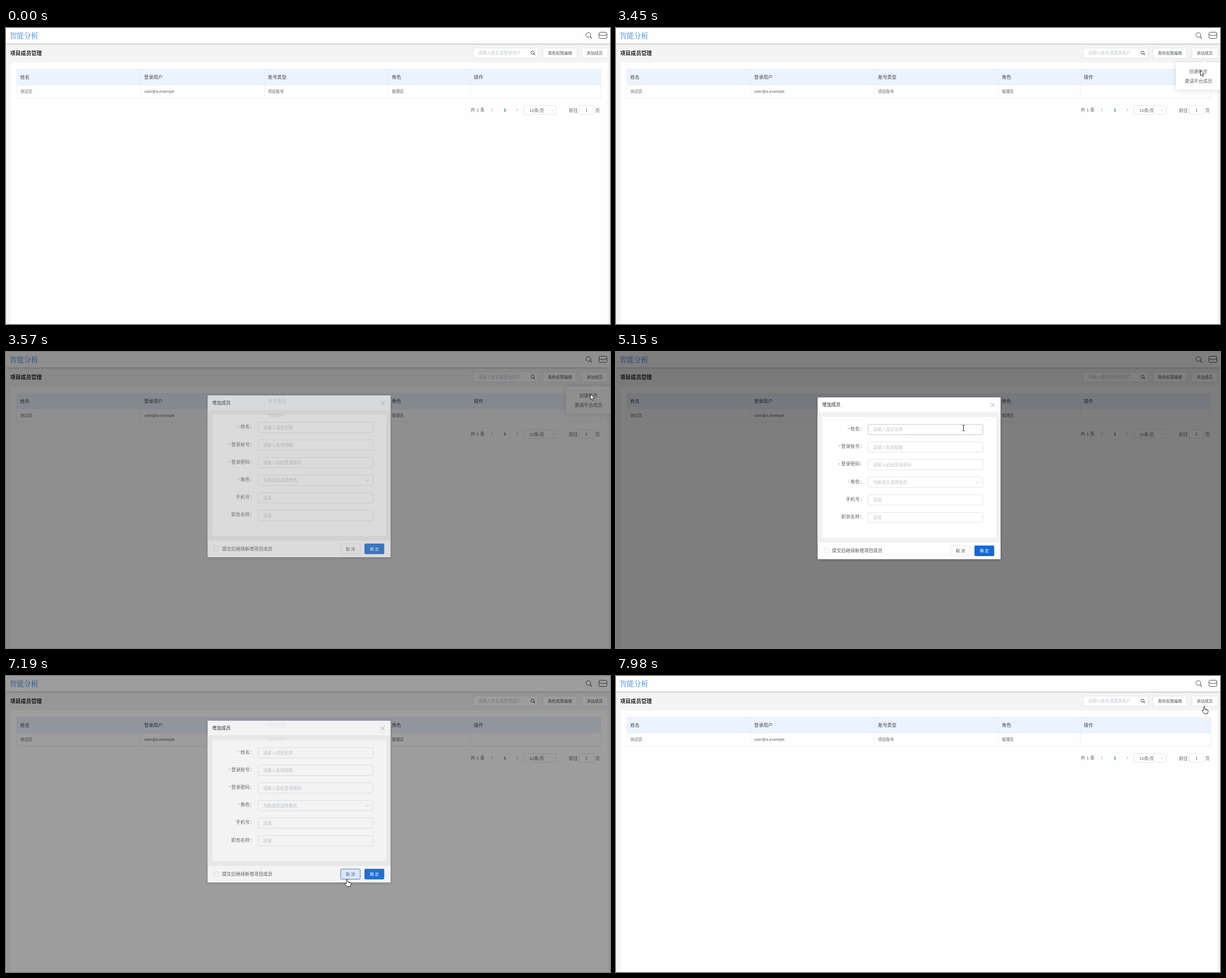
Write an HTML page that moves like this. It is 1068 by 525 pixels and loops after 8 s.

```html
<!DOCTYPE html>
<html>
<head>
<meta charset="utf-8">
<style>
  html, body { margin: 0; width: 100%; height: 100%; overflow: hidden; background: #fefefe; }
  svg { display: block; width: 1068px; height: 525px; font-family: "Liberation Sans", "Noto Sans CJK SC", sans-serif; }
  text { white-space: pre; }
  .header { filter: drop-shadow(0 1px 1.5px rgba(0, 0, 0, .25)); }
  .menu { filter: drop-shadow(0 1px 4px rgba(0, 0, 0, .13)); }
  .box { filter: drop-shadow(0 1px 2px rgba(0, 0, 0, .3)); }
</style>
</head>
<body>
<svg id="stage" viewBox="0 0 1068 525"></svg>
<script>
const LOOP = 8000;
const stage = document.getElementById('stage');

const rect = (x, y, w, h, fill, extra = '') =>
  `<rect x="${x}" y="${y}" width="${w}" height="${h}" fill="${fill}" ${extra}/>`;
const text = (x, y, size, fill, str, extra = '') =>
  `<text x="${x}" y="${y}" font-size="${size}" fill="${fill}" ${extra}>${str}</text>`;
const line = (d, color, width = 0.8, extra = '') =>
  `<path d="${d}" fill="none" stroke="${color}" stroke-width="${width}" ${extra}/>`;
const field = (x, y, w, h, extra = '') =>
  rect(x, y, w, h, '#fff', `stroke="#dcdfe6" stroke-width=".8" rx="2" ${extra}`);
const button = (x, y, w, h, label, id) =>
  `<g id="${id}">` + field(x, y, w, h) +
  text(x + w / 2, y + h / 2 + 2.7, 7.1, '#505256', label, 'text-anchor="middle"') + '</g>';
const lens = (x, y, r, color) =>
  `<circle cx="${x}" cy="${y}" r="${r}" fill="none" stroke="${color}"/>` +
  line(`M${x + r * .7} ${y + r * .7}l${r * .8} ${r * .8}`, color, 1.3);
const chevron = (x, y, s, color) => line(`M${x - s} ${y - s / 2}l${s} ${s}l${s} ${-s}`, color);

function page() {
  const columns = [[19, '姓名', '测试员'], [238, '登录用户', 'user@a.example'], [457, '账号类型', '项目账号'],
    [676, '角色', '管理员'], [821, '操作', '']];
  const grid = '#e9edf4', ink = '#606266';
  return rect(0, 0, 1068, 525, '#f4f4f4') +
    rect(0, 0, 1068, 27.5, '#fefefe', 'class="header"') +
    text(6.5, 17.5, 12.6, '#7aabe8', '智能分析',
      `font-weight="bold" style="font-family:'Noto Serif CJK SC','Noto Sans CJK SC',serif"`) +
    lens(1029.7, 12.3, 4.2, '#555') +
    line('M1050.5 7.5h10q2 0 2 2v7q0 2-2 2h-10q-2 0-2-2v-7q0-2 2-2M1048.5 11.5q7 4 14 0', '#555', 1) +
    text(7.5, 48, 9.3, '#222', '项目成员管理', 'font-weight="bold"') +
    field(826, 35.5, 115, 18) + text(835, 47.3, 7.5, '#c0c4cc', '请输入姓名或登录用户') +
    lens(931, 43.6, 2.8, '#555') +
    button(949.5, 35.5, 60, 18, '角色权限编辑', 'roles') +
    button(1018, 35.5, 46, 18, '添加成员', 'add') +
    rect(8, 61, 1056, 464, '#fefefe') +
    rect(19, 73, 1033, 28, '#ebf3fe') +
    rect(19, 101, 1033, 23.5, '#f5f7fa', 'id="row" opacity="0"') +
    columns.map(([x, head, cell]) => line(`M${x + .3} 73V124.5`, grid) +
      text(x + 6.2, 89.8, 8.2, '#444', head) + text(x + 6.2, 114.5, 7.1, ink, cell)).join('') +
    line('M19 73H1052M19 101H1052M19 124.3H1052M1051.7 73V124.5', grid) +
    text(821.5, 147.7, 8, ink, '共 1 条') +
    line('M860.5 142.5l-2.5 2.5l2.5 2.5M902.7 142.5l2.5 2.5l-2.5 2.5', '#999') +
    text(882, 147.6, 7.5, '#1168c8', '1', 'text-anchor="middle" font-weight="bold"') +
    field(915.5, 137.5, 57.5, 15.5) + text(925.5, 148.5, 7.6, ink, '10条/页') + chevron(966, 146, 2, '#c0c4cc') +
    text(995.3, 148.5, 7.9, ink, '前往') + field(1013.5, 137.5, 26, 15.5) +
    text(1026.3, 148.3, 7.5, ink, '1', 'text-anchor="middle"') + text(1042, 148.5, 7.9, ink, '页');
}

function menu() {
  return '<g id="menu"><g class="menu">' + rect(990, 61, 90, 48.5, '#fff', 'rx="2"') +
    '<path d="M1037.5 61.2l3.5-3.5l3.5 3.5z" fill="#fff"/></g>' +
    text(1013.5, 79.8, 8.15, '#606266', '创建账号') + text(1005.5, 97.3, 8.15, '#606266', '邀请平台成员') + '</g>';
}

function dialog() {
  const rows = [['姓名', '请输入成员名称', 1], ['登录账号', '请输入有效邮箱', 1], ['登录密码', '请输入初始登录密码', 1],
    ['角色', '为新成员选择角色', 1], ['手机号', '选填'], ['职务名称', '选填']];
  return '<g id="dialog">' + rect(356.5, 80.5, 323.5, 287, '#fff', 'class="box" rx="1"') +
    rect(356.5, 106.5, 323.5, 231.5, '#f1f1f1') + rect(365, 115, 307.5, 214.5, '#fff') +
    text(364.5, 96.2, 8.15, '#222', '增加成员', 'font-weight="500"') +
    line('M662.7 90.5l7 7m0-7l-7 7', '#909399') +
    rows.map(([label, hint, required], i) => {
      const y = 128.3 + i * 31.2, x = 431 - label.length * 8.2;
      return (required ? text(x - 5, y + 10.8, 8, '#f56c6c', '*') : '') +
        text(x, y + 10.6, 8.2, '#606266', label + '：') +
        field(445.8, y, 203, 18.3, i ? '' : 'id="name"') + text(454.5, y + 12.1, 7.55, '#c0c4cc', hint);
    }).join('') +
    chevron(639, 231.3, 3, '#c0c4cc') +
    rect(368.2, 348.3, 7.8, 7.8, '#fff', 'stroke="#dcdfe6" stroke-width=".8" rx="1"') +
    text(382, 355.2, 8.1, '#505256', '提交后继续新增项目成员') +
    button(591.8, 343.7, 34.5, 18, '取 消', 'cancel') +
    rect(633.8, 343.3, 35, 18.8, '#1269d9', 'rx="2"') +
    text(651.3, 355.4, 7.1, '#fff', '确 定', 'text-anchor="middle" font-weight="500"') + '</g>';
}

const outlined = 'fill="#fff" stroke="#222" stroke-width=".9" stroke-linejoin="round"';
const cursors = {
  arrow: `<path d="M0 0V9.5L2.2 7.5L3.8 11L5.4 10.3L3.9 6.9H7z" ${outlined}/>`,
  hand: `<path d="M-1 1Q0-.5 1 1V5L6 6.3Q7.3 6.8 7 9L6 13.5H0L-3.5 9Q-4.3 7-2.5 7.3L-1 8.5z" ${outlined}/>` +
    line('M2.8 5.5v2M4.7 6v2', '#222', .7),
  beam: line('M-2-5H-.5L0-4.5L.5-5H2M0-4.5V4.5M-2 5H-.5L0 4.5L.5 5H2', '#222', .9)
};

stage.innerHTML = page() + menu() + rect(0, 0, 1068, 525, '#000', 'id="shade"') + dialog() +
  Object.entries(cursors).map(([kind, shape]) => `<g id="${kind}">${shape}</g>`).join('');
const el = id => document.getElementById(id);

// Pointer stops: time, x, y and, where it changes, the shape from then on
const stops = [
  [180, 985, 525, 'arrow'], [500, 1000, 330], [960, 1030, 86], [1090, 1036, 54, 'hand'], [1300, 1037, 50],
  [1510, 1035.5, 52.5], [2500, 1035.5, 52.5], [2650, 1034, 75], [3010, 1033.5, 75, 'arrow'],
  [4240, 1033.5, 75], [4400, 950, 100], [4560, 750, 140], [4680, 635, 137, 'beam'], [4720, 614, 134],
  [5150, 614.5, 135], [5390, 614.5, 137], [5560, 598, 139], [5730, 612, 139], [6140, 612, 139],
  [6200, 625, 150, 'arrow'], [6330, 655, 200], [6480, 673, 290], [6620, 665, 350], [6740, 622, 361, 'hand'],
  [6830, 603, 360], [7400, 603, 360, 'arrow'], [7600, 740, 290], [7750, 940, 135], [7850, 1024, 70],
  [7940, 1037, 55, 'hand'], [7980, 1040, 53.5], [LOOP, 1040, 53.5]
];

const clamp = v => Math.max(0, Math.min(1, v));
const ramp = (t, start, length) => clamp((t - start) / length);

function bezier(x1, y1, x2, y2) {
  const at = (a, b, u) => 3 * a * u * (1 - u) ** 2 + 3 * b * u * u * (1 - u) + u ** 3;
  return x => {
    let lo = 0, hi = 1;
    for (let i = 0; i < 20; i++) {
      const mid = (lo + hi) / 2;
      if (at(x1, x2, mid) < x) lo = mid; else hi = mid;
    }
    return at(y1, y2, (lo + hi) / 2);
  };
}
const ease = bezier(.25, .1, .25, 1);
const swift = bezier(.23, 1, .32, 1);

// Eased 0 to 1 at start, back to 0 at end
const pulse = (t, start, end, length, curve = ease) =>
  t < end ? curve(ramp(t, start, length)) : 1 - curve(ramp(t, end, length));

const mix = (a, b, k) => `rgb(${a.map((v, i) => v + (b[i] - v) * k)})`;
const blue = [27, 99, 196];

function tint(id, k, hoverFill) {
  const [frame, label] = el(id).children;
  frame.setAttribute('stroke', mix([220, 223, 230], blue, k));
  frame.setAttribute('fill', mix([255, 255, 255], hoverFill, k));
  label.setAttribute('fill', mix([80, 82, 86], blue, k));
}

function movePointer(t) {
  const next = stops.findIndex(s => s[0] > t);
  let shown = null, x = 0, y = 0;
  if (next > 0) {
    const a = stops[next - 1], b = stops[next], k = ramp(t, a[0], b[0] - a[0]);
    x = a[1] + (b[1] - a[1]) * k;
    y = a[2] + (b[2] - a[2]) * k;
    shown = stops.slice(0, next).reverse().find(s => s[3])[3];
  }
  for (const kind in cursors) {
    el(kind).setAttribute('visibility', kind === shown ? 'visible' : 'hidden');
    el(kind).setAttribute('transform', `translate(${x} ${y})`);
  }
}

function draw(t) {
  el('row').setAttribute('opacity', pulse(t, 880, 960, 140));
  tint('add', pulse(t, 1090, 3010, 100), [255, 255, 255]);
  tint('cancel', pulse(t, 6760, 7420, 100), [230, 240, 252]);
  el('name').setAttribute('stroke', t > 4660 && t < 6190 ? '#b4b8c0' : '#dcdfe6');

  const open = pulse(t, 1250, 3575, 270, swift);
  el('menu').setAttribute('opacity', open);
  el('menu').setAttribute('transform', `translate(0 ${61 * (1 - open)}) scale(1 ${open})`);

  el('shade').setAttribute('opacity', .5 * pulse(t, 3452, 7157, 200));
  const shown = pulse(t, 3452, 7157, 300);
  el('dialog').setAttribute('opacity', shown);
  el('dialog').setAttribute('transform', `translate(0 ${-11.1 * (1 - shown)})`);
  movePointer(t);
}

function tick() {
  draw(performance.now() % LOOP);
  requestAnimationFrame(tick);
}
tick();
</script>
</body>
</html>
```
